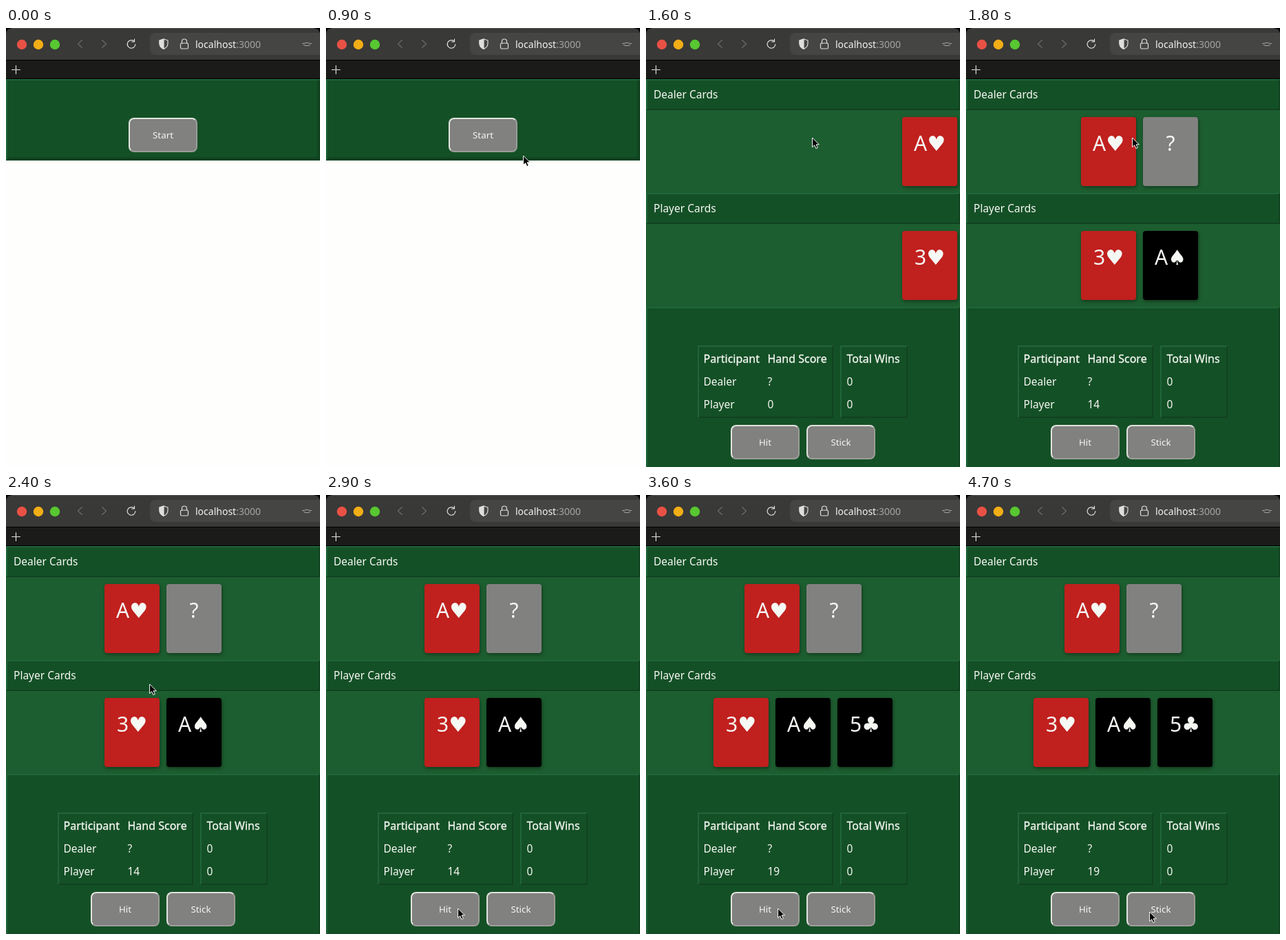
An HTML page for the animation above (5 s loop, 456 by 636 pixels).

```html
<!DOCTYPE html>
<html lang="en">
<head>
<meta charset="utf-8">
<title>Card table</title>
<style>
html, body { margin: 0; width: 100%; height: 100%; overflow: hidden; background: #fefefd; }
#stage { position: relative; width: 456px; height: 636px; overflow: hidden; color: #f6f8f4; font: 15.5px "Noto Sans", sans-serif; }
#stage div, #stage svg { position: absolute; box-sizing: border-box; white-space: pre; }
.bevel { border: 2px solid; border-color: #20653a #114220 #114220 #20653a; background: #145026; }
.head { left: 0; width: 456px; height: 45px; padding-left: 9px; line-height: 41px; }
.row { left: 0; width: 456px; height: 121px; overflow: hidden; background: #1d5e30; }
.col { top: 463px; line-height: 33px; }
.col b { font-weight: 400; font-size: 16px; -webkit-text-stroke: .3px; }
.button { width: 100px; height: 50px; border: 2px solid; border-color: #e2e4df #9c9d9a #9c9d9a #e2e4df; border-radius: 8px; background: #818180; font-size: 13.33px; line-height: 46px; text-align: center; }
.button.pressed { border-color: #9c9d9a #e2e4df #e2e4df #9c9d9a; }
.card { top: 10px; width: 80px; height: 100px; border-radius: 4px; box-shadow: 1px 2px 5px #0006; font-size: 30px; line-height: 75px; text-align: center; }
.card span { font-family: "DejaVu Sans", sans-serif; }
</style>
</head>
<body>
<div id="stage">
  <div id="game">
    <div class="bevel head" style="top:74px">Dealer Cards</div>
    <div class="row" id="dealer" style="top:119px"></div>
    <div class="bevel head" style="top:239px">Player Cards</div>
    <div class="row" id="player" style="top:284px"></div>
    <div class="bevel" style="left:0;top:404px;width:456px;height:236px"></div>
    <div class="bevel" style="left:75px;top:460px;width:197px;height:105px"></div>
    <div class="bevel" style="left:282px;top:460px;width:98px;height:105px"></div>
    <div class="col" style="left:83.5px"><b>Participant</b>
Dealer
Player</div>
    <div class="col" style="left:176.5px"><b>Hand Score</b>
?
<span id="score"></span></div>
    <div class="col" style="left:291.5px"><b>Total Wins</b>
0
0</div>
    <div class="button" id="hit" style="left:123px;top:575px">Hit</div>
    <div class="button" style="left:233px;top:575px">Stick</div>
  </div>
  <div id="intro">
    <div class="bevel" style="left:0;top:74px;width:456px;height:118px;box-shadow:inset -1px -2px 3px #0e3d1d"></div>
    <div class="button" id="start" style="left:178px;top:130px">Start</div>
  </div>
  <svg width="456" height="74" style="left:0;top:0" fill="none" stroke-linecap="round" stroke-linejoin="round">
    <path d="M0 0H456V74H0Z" fill="#000"/>
    <path d="M0 46V10Q0 0 10 0H446Q456 0 456 10V46Z" fill="#393937"/>
    <path d="M9 .5H447" stroke="#545452"/>
    <path d="M0 47H456V73H0Z" fill="#1b1b1a"/>
    <path d="M456 7H218Q209 7 209 16V30Q209 39 218 39H456Z" fill="#454543"/>
    <circle cx="23" cy="24" r="7.2" fill="#ea5145"/>
    <circle cx="47" cy="24" r="7.2" fill="#f2ae17"/>
    <circle cx="71" cy="24" r="7.2" fill="#57c732"/>
    <path d="M110.500 17.500L104.500 23L110.500 28.500M139.500 17.500L145.500 23L139.500 28.500" stroke="#6b6b69" stroke-width="1.200"/>
    <g stroke="#dededc" stroke-width="1.200">
      <path d="M185.500 18.800A5.800 5.800 0 1 0 187.800 23.500M186.500 16V20H182.500"/>
      <path d="M229 16L235 18V22Q235 28 229 30.500Q223 28 223 22V18Z"/>
      <path d="M229 16V30.500Q223 28 223 22V18Z" fill="#dededc"/>
      <rect x="253.500" y="22" width="11" height="8" rx="1.500"/>
      <path d="M255.500 22V19.500a3.500 3.500 0 0 1 7 0V22"/>
      <path d="M8.500 60.500H20.500M14.500 54.500V66.500"/>
    </g>
    <path d="M430.500 22.500H433L435 21.500H439L441 22.500H443.500M432.500 24.500L435 25.500H439L441.500 24.500" stroke="#a6a6a4"/>
    <text x="275" y="28.500" font-size="14" fill="#f4f4f2">localhost<tspan fill="#a3a3a1">:3000</tspan></text>
  </svg>
  <svg id="cursor" width="13" height="19" style="left:0;top:0">
    <path d="M.6 1V14.500L3.700 11.700L5.900 16.600L8.300 15.500L6.100 10.800H10.400Z" fill="#000" stroke="#fff"/>
  </svg>
</div>
<script>
const LOOP = 5000, STEP = 100, STAGE_WIDTH = 456;
const DEAL = 1600, HIT = 3300, SLIDE = 475;
const RED = '#c0201e', BLACK = '#000', GREY = '#818180';
const $ = id => document.getElementById(id);

// [time, x, y]: each position holds until the next
const cursorPath = [
  [300, 385, 232], [400, 338, 208], [500, 309, 195],
  [900, 286, 184], [1000, 256, 167], [1100, 241, 158],
  [2400, 208, 273], [2500, 219, 522],
  [2800, 200, 574], [2900, 191, 598],
  [4500, 238, 597], [4600, 284, 595], [4700, 266, 603]
];

function makeCard(row, rank, suit, color, start) {
  const el = document.createElement('div');
  el.className = 'card';
  el.style.background = color;
  el.innerHTML = `${rank}<span>${suit}</span>`;
  $(row).append(el);
  return { el, start };
}

const dealer = [
  makeCard('dealer', 'A', '♥', RED, 1461),
  makeCard('dealer', '?', '', GREY, 1461)
];
const player = [
  makeCard('player', '3', '♥', RED, 1461),
  makeCard('player', 'A', '♠', BLACK, 1461),
  makeCard('player', '5', '♣', BLACK, 3090)
];

// cubic-bezier(.25, .1, .25, 1)
function ease(p) {
  if (p <= 0) return 0;
  if (p >= 1) return 1;
  let low = 0, high = 1, s;
  for (let i = 0; i < 20; i++) {
    s = (low + high) / 2;
    if (.75 * s * (1 - s) + s ** 3 < p) low = s; else high = s;
  }
  return .3 * s * (1 - s) ** 2 + 3 * s * s * (1 - s) + s ** 3;
}

function layOut(cards, count, t) {
  cards.forEach(({ el, start }, i) => {
    const rest = STAGE_WIDTH / 2 - (count * 90 - 10) / 2 + i * 90;
    const offset = STAGE_WIDTH * (1 - ease((t - start) / SLIDE));
    el.style.left = Math.round(rest + offset) + 'px';
    el.hidden = i >= count;
  });
}

function render(now) {
  const t = Math.floor(now % LOOP / STEP) * STEP;
  const playing = t >= DEAL, hasHit = t >= HIT;
  $('intro').hidden = playing;
  $('game').hidden = !playing;
  $('start').classList.toggle('pressed', t === DEAL - STEP);
  $('hit').classList.toggle('pressed', t === HIT - STEP);
  $('score').textContent = hasHit ? 19 : t > DEAL ? 14 : 0;
  layOut(dealer, 2, t);
  layOut(player, hasHit ? 3 : 2, t);

  const spot = cursorPath.filter(([time]) => time <= t).pop();
  $('cursor').style.visibility = spot ? 'visible' : 'hidden';
  if (spot) $('cursor').style.transform = `translate(${spot[1]}px, ${spot[2]}px)`;
}

const begin = performance.now();
function tick() {
  render(performance.now() - begin);
  requestAnimationFrame(tick);
}
tick();
</script>
</body>
</html>
```
